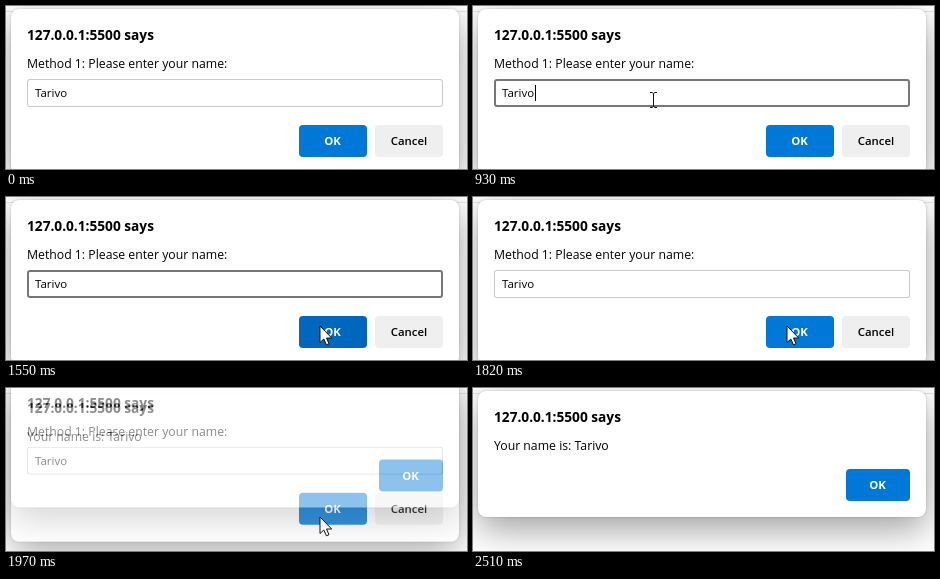
Animation, 461 px wide and 163 px high, one loop 3140 ms. Source, as an HTML page:

```html
<!DOCTYPE html>
<html lang="en">
<head>
<meta charset="utf-8">
<title>Prompt dialog</title>
<style>
  html, body { margin: 0; width: 100%; height: 100%; overflow: hidden; background: #fff; }
  body { position: relative; font: 12.25px/20px "Open Sans", "Noto Sans", sans-serif; color: #000; }
  body * { position: absolute; box-sizing: border-box; white-space: nowrap; }
  .rule { top: 5px; width: 100%; height: 1px; background: #e6e6e6; }
  .dialog {
    left: 5px; top: 3px; width: 448px; background: #fff; border-radius: 8px;
    box-shadow: 0 0 2px rgba(0, 0, 0, .25), 0 12px 36px rgba(0, 0, 0, .38);
  }
  #ask { height: 165px; }
  #answer { height: 126px; }
  h1 { left: 16px; top: 16px; margin: 0; font-size: 13.7px; line-height: 20px; font-weight: 700; }
  p { left: 16px; top: 45px; margin: 0; }
  .field {
    left: 16px; top: 70px; width: 416px; height: 28px; border-radius: 3px;
    box-shadow: inset 0 0 0 1px #c8c8c8; font-size: 11.5px;
  }
  .field.focus { box-shadow: inset 0 0 0 2px #777; }
  .field span { left: 8px; top: 4px; }
  #caret { left: 41px; top: 6px; width: 1px; height: 16px; background: #000; }
  .button {
    width: 68px; height: 32px; border-radius: 4px; background: #efefef;
    font-size: 11.4px; font-weight: 600; line-height: 32px; text-align: center;
  }
  .primary { background: #0078d7; color: #fff; font-weight: 700; text-indent: -1px; }
  .primary.dark { background: #0067bf; }
  #ask .button { left: 364px; top: 116px; }
  #ask .primary { left: 288px; }
  #answer .button { left: 368px; top: 78px; width: 64px; }
  svg { left: 0; top: 0; overflow: visible; }
</style>
</head>
<body>
<div class="rule"></div>
<div class="dialog" id="ask">
  <h1>127.0.0.1:5500 says</h1>
  <p>Method 1: Please enter your name:</p>
  <div class="field" id="field"><span>Tarivo</span><i id="caret"></i></div>
  <div class="button primary" id="ok">OK</div>
  <div class="button">Cancel</div>
</div>
<div class="dialog" id="answer">
  <h1>127.0.0.1:5500 says</h1>
  <p>Your name is: Tarivo</p>
  <div class="button primary">OK</div>
</div>
<svg id="cursor" width="1" height="1">
  <path id="arrow" d="M0 0V16.5L3.8 13L6.4 18.8L9 17.7L6.5 12H11.7Z" fill="#fff" stroke="#111"/>
  <path id="beam" d="M-3 -7.5H-1L.5 -6.5L2 -7.5H4M.5 -6.5V6.5M-3 7.5H-1L.5 6.5L2 7.5H4" fill="none" stroke="#111"/>
</svg>
<script>
const LOOP = 3140;
const el = id => document.getElementById(id);
const [ask, answer, field, caret, ok, cursor, arrow, beam] =
  ["ask", "answer", "field", "caret", "ok", "cursor", "arrow", "beam"].map(el);

const within = (t, from, to) => t >= from && t < to;
const show = (node, on) => { node.style.display = on ? "" : "none"; };

// Progress from 0 to 1 in a fixed number of even jumps
function stepped(t, from, to, jumps) {
  const p = Math.min(1, Math.max(0, (t - from) / (to - from)));
  return Math.floor(p * jumps + 1e-6) / jumps;
}
const smooth = p => p * p * (3 - 2 * p);

const moves = [
  { from: 190, to: 600, jumps: 6, start: [349, 132], end: [180, 94] },
  { from: 930, to: 1410, jumps: 7, start: [180, 94], end: [314, 129] },
  { from: 2040, to: 2510, jumps: 7, start: [314, 129], end: [340, 168] }
];

function place(node, y, opacity) {
  node.style.transform = `translateY(${y}px)`;
  node.style.opacity = opacity;
}

function drawCursor(t) {
  const move = moves.filter(m => t >= m.from).pop();
  show(cursor, move && t < 2510);
  if (!move) return;
  const p = smooth(stepped(t, move.from, move.to, move.jumps));
  const [x, y] = move.start.map((a, i) => Math.round(a + (move.end[i] - a) * p));
  const overField = y > 73 && y < 101;
  cursor.style.transform = `translate(${x}px, ${y}px)`;
  show(beam, overField);
  show(arrow, !overField);
}

function draw(now) {
  const t = now % LOOP;
  const swap = stepped(t, 1830, 2040, 3) ** 2;
  place(ask, -32 * swap, 1 - swap * swap);
  place(answer, -17 * (1 - swap), swap);
  field.classList.toggle("focus", within(t, 730, 1620));
  show(caret, within(t, 730, 1210));
  ok.classList.toggle("dark", within(t, 1480, 1690));
  drawCursor(t);
}

function tick() {
  draw(performance.now());
  requestAnimationFrame(tick);
}
tick();
</script>
</body>
</html>
```
